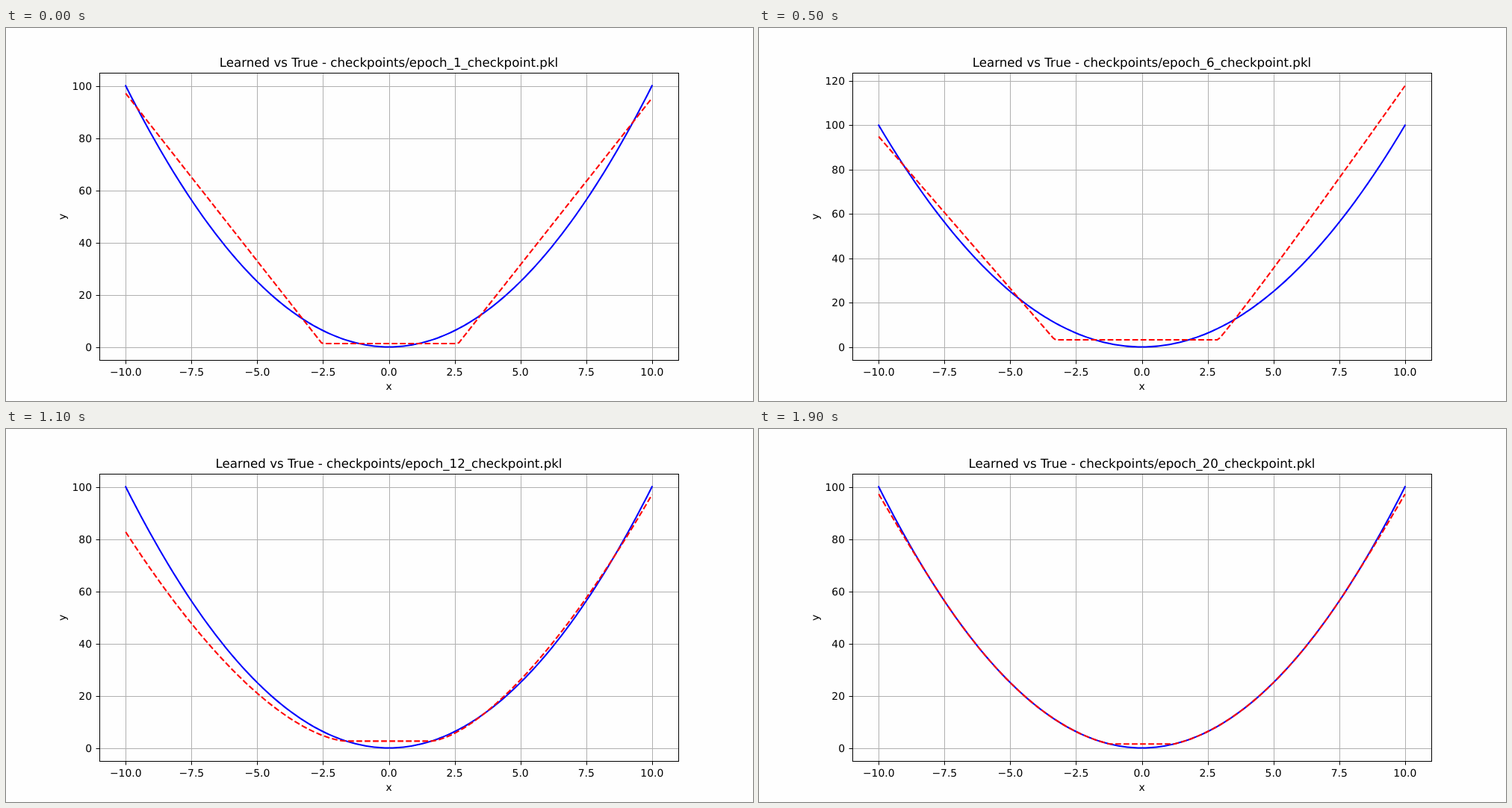
An HTML page with a canvas for the animation above (2000 ms loop, 1000 by 500 pixels).

```html
<!DOCTYPE html>
<html lang="en">
<head>
<meta charset="utf-8">
<title>Learned vs True</title>
<style>
  html, body { margin: 0; width: 100%; height: 100%; overflow: hidden; background: #fefefe; }
  canvas { display: block; width: 1000px; height: 500px; }
</style>
</head>
<body>
<canvas id="plot" width="1000" height="500"></canvas>
<script>
const ctx = document.getElementById('plot').getContext('2d');
const BOX = { left: 125, right: 900, top: 60, bottom: 445 };
const PT = 100 / 72;
const STEP = 100, EPOCHS = 20, SAMPLES = 200;

// Flat floor with an arm on each side; an arm is [knee, end value, power].
const hinge = (floor, left, right) => x => {
  const [knee, end, power] = x < 0 ? left : right;
  const u = Math.max(0, (Math.abs(x) - knee) / (10 - knee));
  return floor + (end - floor) * u ** power;
};

// Parabola with a flat floor and slightly missed end values.
const settled = (floor, left, right) => x => {
  const miss = (x < 0 ? left : right) - 100;
  const tail = Math.max(0, (Math.abs(x) - 8) / 2);
  return Math.max(floor, x * x + miss * tail ** 2);
};

// Shape of the learned curve at key epochs, blended in between.
const stages = [
  { epoch: 1, fit: hinge(1.3, [2.54, 97.1, 1], [2.64, 95.3, 1]) },
  { epoch: 3, fit: hinge(2.1, [2.99, 85, 1], [3.01, 84.3, 1]) },
  { epoch: 6, fit: hinge(3.2, [3.31, 94.9, 1], [2.9, 117.8, 1.04]) },
  { epoch: 8, fit: hinge(3.5, [3.3, 86.1, 1.05], [2.85, 105.6, 1.12]) },
  { epoch: 12, fit: hinge(2.6, [1.6, 82.7, 1.63], [1.6, 97, 1.54]) },
  { epoch: 14, fit: settled(2.2, 99, 98) },
  { epoch: 19, fit: settled(1.6, 102, 102) },
  { epoch: 20, fit: settled(1.5, 97.2, 97.2) }
];

const lerp = (a, b, k) => a + (b - a) * k;
const snap = v => Math.floor(v + 0.5) + 0.5;
const px = x => 512.5 + x * 775 / 22;
const xs = Array.from({ length: SAMPLES }, (_, i) => -10 + 20 * i / (SAMPLES - 1));

function learned(epoch) {
  const i = Math.max(1, stages.findIndex(s => s.epoch >= epoch));
  const a = stages[i - 1], b = stages[i];
  const k = (epoch - a.epoch) / (b.epoch - a.epoch);
  return xs.map(x => lerp(a.fit(x), b.fit(x), k));
}

function line(x0, y0, x1, y1, color) {
  ctx.strokeStyle = color;
  ctx.lineWidth = 1;
  ctx.beginPath();
  ctx.moveTo(x0, y0);
  ctx.lineTo(x1, y1);
  ctx.stroke();
}

function curve(ys, py, color, dash, cap) {
  ctx.strokeStyle = color;
  ctx.lineWidth = 1.5 * PT;
  ctx.lineJoin = 'round';
  ctx.lineCap = cap;
  ctx.setLineDash(dash);
  ctx.beginPath();
  ys.forEach((y, i) => ctx.lineTo(px(xs[i]), py(y)));
  ctx.stroke();
  ctx.setLineDash([]);
  ctx.lineCap = 'butt';
}

function text(str, x, y, align = 'center', size = 10) {
  ctx.font = `${size * PT}px "DejaVu Sans", sans-serif`;
  ctx.textAlign = align;
  ctx.fillText(str, x, y);
}

function draw(epoch) {
  const fit = learned(epoch);
  const peak = Math.max(100, ...fit);
  const py = y => 427.5 - y * 350 / peak;
  const xTicks = [], yTicks = [];
  for (let x = -10; x <= 10; x += 2.5) xTicks.push(x);
  for (let y = 0; y <= peak * 1.05; y += 20) yTicks.push(y);

  ctx.fillStyle = '#fefefe';
  ctx.fillRect(0, 0, 1000, 500);
  ctx.fillStyle = '#000';
  ctx.textRendering = 'geometricPrecision';

  for (const x of xTicks) line(snap(px(x)), BOX.top, snap(px(x)), BOX.bottom, '#b0b0b0');
  for (const y of yTicks) line(BOX.left, snap(py(y)), BOX.right, snap(py(y)), '#b0b0b0');

  curve(xs.map(x => x * x), py, '#00f', [], 'square');
  curve(fit, py, '#f00', [5.55 * PT, 2.4 * PT], 'butt');

  for (const x of xTicks) {
    const gx = snap(px(x));
    line(gx, 445.5, gx, 450.4, '#000');
    text(x.toFixed(1).replace('-', '\u2212'), px(x), 466);
  }
  for (const y of yTicks) {
    const gy = snap(py(y));
    line(125.5, gy, 120.6, gy, '#000');
    text(String(y), 115, Math.round(py(y) + 5), 'right');
  }
  ctx.strokeStyle = '#000';
  ctx.lineWidth = 1;
  ctx.lineJoin = 'miter';
  ctx.strokeRect(BOX.left + 0.5, BOX.top + 0.5, BOX.right - BOX.left, BOX.bottom - BOX.top);

  text('x', 512.5, 485);
  ctx.save();
  ctx.translate(80, 253);
  ctx.rotate(-Math.PI / 2);
  text('y', 0, 0);
  ctx.restore();
  text(`Learned vs True - checkpoints/epoch_${epoch}_checkpoint.pkl`, 512.5, 52, 'center', 12);
}

const start = performance.now();
let shown = 0;
function tick() {
  const t = Math.max(0, performance.now() - start);
  const epoch = Math.floor(t / STEP) % EPOCHS + 1;
  if (epoch !== shown) draw(shown = epoch);
  requestAnimationFrame(tick);
}
tick();
</script>
</body>
</html>
```
